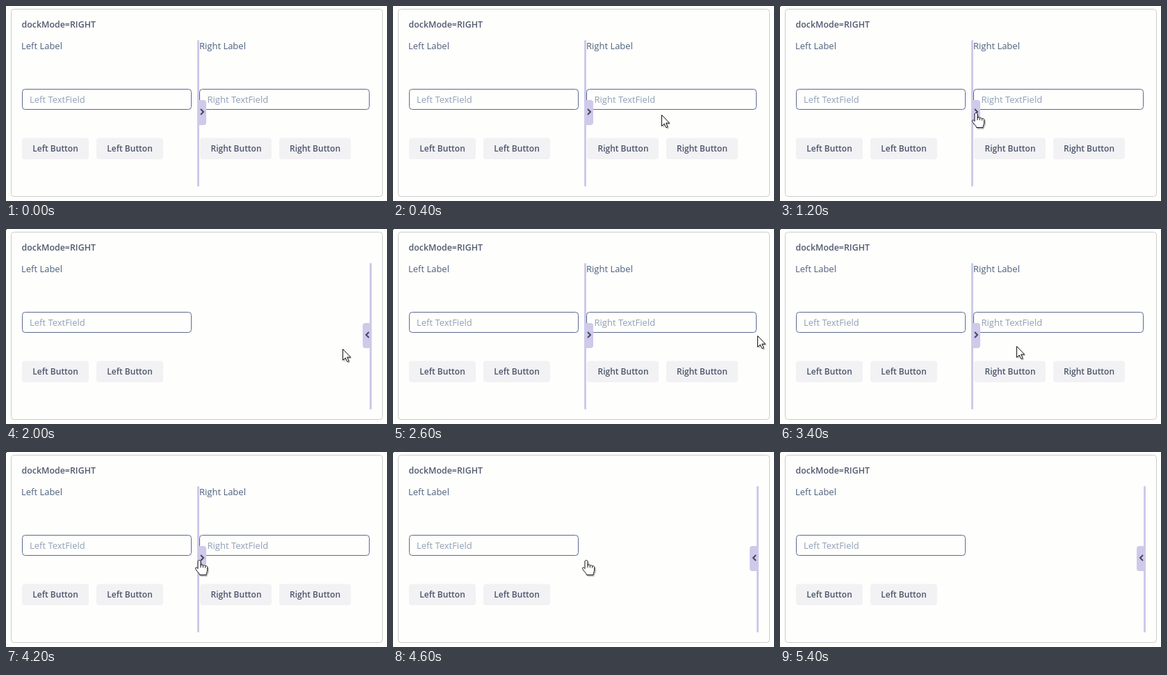
These frames come from a looping animation (548 by 280 pixels, 6 s). An HTML page:

```html
<!DOCTYPE html>
<html lang="en">
<head>
<meta charset="utf-8">
<title>Dock split layout</title>
<style>
html, body { margin: 0; width: 100%; height: 100%; overflow: hidden; background: #fefefd; }
svg { display: block; width: 548px; height: 280px; font: 13px "Open Sans", "Noto Sans", sans-serif; }
.card { fill: none; stroke: #cccccc; }
.title { font-size: 12.4px; font-weight: 600; fill: #505a6e; }
.label { fill: #4c607a; }
.field { fill: #fefefd; stroke: #5b6b8e; }
.hint { fill: #8f9fb3; }
.button { fill: #f2f1f4; }
.caption { font-size: 12px; font-weight: 600; fill: #4b566b; text-anchor: middle; }
.bar { fill: #cfc9ea; }
.chevron { fill: none; stroke: #3f4b63; stroke-width: 2; }
.arrow path, .hand path { fill: #fff; stroke: #111; stroke-linejoin: round; }
.arrow .shade, .hand .shade { fill: #000; stroke: none; opacity: .25; }
.hand .lines { fill: none; }

.open, .docked, .dot, .pointer, .arrow, .hand { animation: 6s step-end infinite; }
.open { animation-name: open; }
.docked { animation-name: docked; }
.dot { animation-name: dot; }
.pointer { animation-name: travel; }
.arrow { animation-name: arrow; }
.hand { animation-name: hand; }

@keyframes open {
  0%, 40% { opacity: 1; }
  23.33%, 76.66%, 100% { opacity: 0; }
}
@keyframes docked {
  0%, 40% { opacity: 0; }
  23.33%, 76.66%, 100% { opacity: 1; }
}
@keyframes dot {
  0% { opacity: 0; }
  20%, 100% { opacity: 1; }
}
@keyframes arrow {
  0%, 13.33%, 36.66%, 66.66%, 90%, 100% { opacity: 0; }
  3.33%, 26.66%, 43.33%, 80% { opacity: 1; }
}
@keyframes hand {
  0%, 26.66%, 43.33%, 80%, 100% { opacity: 0; }
  13.33%, 36.66%, 66.66% { opacity: 1; }
}
@keyframes travel {
  0%, 3.33% { transform: translate(419px, 59px); }
  6.66% { transform: translate(386px, 156px); }
  10% { transform: translate(326px, 200px); }
  13.33% { transform: translate(282px, 153px); }
  26.66% { transform: translate(312px, 160px); }
  30% { transform: translate(402px, 172px); }
  33.33% { transform: translate(484px, 172px); }
  36.66% { transform: translate(525px, 153px); }
  43.33% { transform: translate(524px, 153px); }
  46.66% { transform: translate(522px, 152px); }
  50% { transform: translate(470px, 158px); }
  53.33% { transform: translate(390px, 165px); }
  56.66% { transform: translate(340px, 168px); }
  60% { transform: translate(352px, 189px); }
  63.33% { transform: translate(263px, 175px); }
  66.66% { transform: translate(283px, 145px); }
  70% { transform: translate(278px, 155px); }
  80% { transform: translate(277px, 157px); }
  83.33% { transform: translate(270px, 168px); }
  86.66%, 100% { transform: translate(262px, 180px); }
}
</style>
</head>
<body>
<svg viewBox="0 0 548 280">
  <rect class="card" x="7.5" y="4.5" width="534" height="269" rx="4"/>
  <text class="title" x="22.5" y="31">dockMode=RIGHT</text>

  <text class="label" x="22" y="62">Left Label</text>
  <rect class="field" x="23.5" y="119.5" width="243" height="29" rx="4"/>
  <text class="hint" x="34" y="139">Left TextField</text>
  <rect class="button" x="23" y="189.5" width="96" height="30.5" rx="4"/>
  <text class="caption" x="71" y="209">Left Button</text>
  <rect class="button" x="130" y="189.5" width="96" height="30.5" rx="4"/>
  <text class="caption" x="178" y="209">Left Button</text>

  <g class="open">
    <text class="label" x="278" y="62">Right Label</text>
    <rect class="field" x="278.5" y="119.5" width="244" height="29" rx="4"/>
    <text class="hint" x="289.5" y="139">Right TextField</text>
    <rect class="button" x="279" y="189.5" width="103" height="30.5" rx="4"/>
    <text class="caption" x="331" y="209">Right Button</text>
    <rect class="button" x="393" y="189.5" width="103" height="30.5" rx="4"/>
    <text class="caption" x="444.5" y="209">Right Button</text>
    <rect class="bar" x="275" y="49" width="3" height="210" rx="1"/>
    <path class="bar" d="M275 135h9q4 0 4 4v28q0 4-4 4h-9z"/>
    <path class="chevron" d="M280 148l4 4-4 4"/>
  </g>

  <g class="docked">
    <rect class="bar" x="523" y="49" width="3" height="210" rx="1"/>
    <path class="bar" d="M526 135h-9q-4 0-4 4v28q0 4 4 4h9z"/>
    <path class="chevron" d="M522 148l-4 4 4 4"/>
  </g>

  <rect class="dot" width="1" height="1"/>

  <g class="pointer">
    <g class="arrow">
      <path class="shade" d="M2 2v16.5l3.8-3.6 2.6 5.8 2.6-1.2-2.5-5.5h5z"/>
      <path d="M.5.5v16l3.7-3.5 2.6 5.7 2.4-1.1-2.5-5.5h5z"/>
    </g>
    <g class="hand">
      <path class="shade" d="M0 2v10l-5 2 7 10h9l3-7v-6l-8-3-4-6z"/>
      <path d="M-2 2C-2 0 2 0 2 2v6c0-1.6 3.4-1.4 3.4.4C5.6 7 8.6 7.400 8.600 9.200c.4-1.200 3-.8 3 1.200v4.600c0 2-1.600 3.500-1.600 6.500H.5c0-2.500-4.500-5.500-6-9-.6-1.700 1.400-2.300 2.400-1.100L-2 12.500z"/>
      <path class="lines" d="M2 8v3M5.400 8.400V11M8.600 9.200v2.300"/>
    </g>
  </g>
</svg>
</body>
</html>
```
